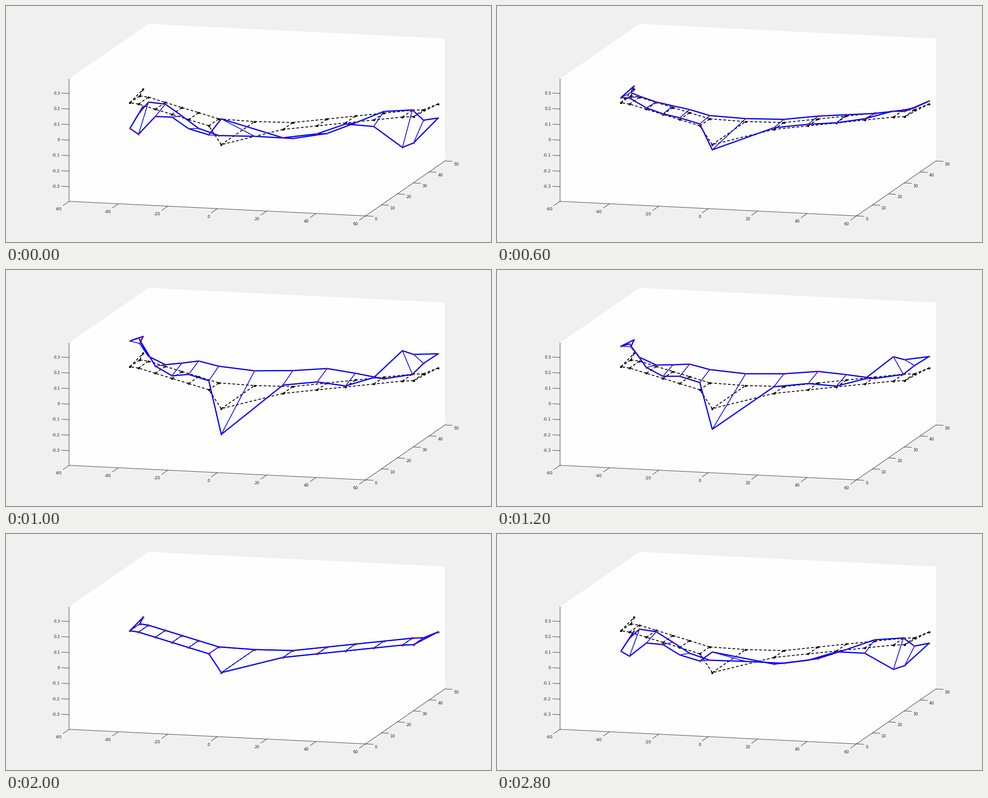
Animation of 1073 by 522 pixels, one loop 3 s. Source, as a matplotlib script:

```python
import numpy as np
import matplotlib.pyplot as plt
from matplotlib.animation import FuncAnimation
from matplotlib.collections import LineCollection

W, H, DPI = 1073, 522, 64
PT = 72 / DPI  # points per pixel
FRAMES, INTERVAL = 15, 200
INK = "#262626"
SPAN, DEPTH, TOP = 60, 50, 0.394  # limits of the 3D box

plt.rcParams["font.family"] = "DejaVu Sans"


def project(x, y, z):
    """Orthographic view of the box, in pixels from the top left."""
    u = np.asarray(x) + SPAN
    return np.stack([139.5 + 5.467 * u + 3.51 * y,
                     432 + 0.269 * u - 2.43 * y - 343.7 * (z + TOP)], axis=-1)


def mirror(half):
    return np.concatenate([half[:0:-1], half])


def around(tip_left, rear, tip_right, front):
    """Order values along the edge of the wing."""
    return np.concatenate([[tip_left], rear, [tip_right], front[::-1]])


# Planform: swept wing of constant chord with a deep centre section
half = np.array([0, 15, 26, 35.1, 44.2, 53.4, 57.4])
x = np.concatenate([-half[:0:-1], half])
front_y = np.interp(abs(x), [0, 15, 53.4, 57.4], [2.5, 18, 33.5, 34.3])
rear_y = front_y + np.where(x == 0, 21, 6.27)
TIP_X, TIP_Y = 59.7, 46.2

# Mode shape: symmetric bending, slight roll, and twist near the tips
front_z = mirror(np.array([-0.166, 0.056, 0.055, 0.012, 0.044, 0.195, 0.167]))
rear_z = mirror(np.array([0.095, 0.105, 0.097, 0.049, 0, 0.015, 0.086]))
twist = 0.00047 * np.sign(x) * np.maximum(abs(x) - 35, 0)

node_x = around(-TIP_X, x, TIP_X, x)
node_y = around(TIP_Y, rear_y, TIP_Y, front_y)
mode = around(0.1, rear_z - twist, 0.1, front_z + twist) - 0.00015 * node_x * (node_x != 0)

m = len(node_x)
outline = [(i, (i + 1) % m) for i in range(m)]
ribs = [(m - 1 - i, i + 1) for i in range(len(x))]


def pose(s):
    return project(node_x, node_y, s * mode)


def edges(points, pairs):
    return [points[list(p)] for p in pairs]


fig = plt.figure(figsize=(W / DPI, H / DPI), dpi=DPI, facecolor="#f0f0f0")
ax = fig.add_axes([0, 0, 1, 1])
ax.set_xlim(0, W)
ax.set_ylim(H, 0)
ax.axis("off")


def line(a, b):
    ax.plot(*np.transpose([a, b]), color=INK, lw=0.9 * PT, zorder=1)


def tick(start, step, gap, value, ha):
    """Tick mark from start, with its label a gap beyond the end."""
    end = start + step
    line(start, end)
    px, py = end + gap
    ax.text(px, py + 3.3, f"{value:g}", ha=ha, va="baseline", color=INK,
            fontsize=9 * PT, zorder=1)


def draw_box():
    left, right = -SPAN, SPAN
    corners = [(left, 0, TOP), (left, DEPTH, TOP), (right, DEPTH, TOP),
               (right, DEPTH, -TOP), (right, 0, -TOP), (left, 0, -TOP)]
    shape = [project(*c) for c in corners]
    ax.fill(*np.transpose(shape), color="#fefefe", lw=0, zorder=0)
    for a, b in [(3, 4), (4, 5)]:
        line(shape[a], shape[b])
    nudge = np.array([-0.3, 0])  # snaps the upright to its pixel column
    line(shape[5] + nudge, shape[0] + nudge)

    for k in range(-3, 4):
        tick(project(left, 0, k / 10), np.array([-16.5, -0.9]),
             np.array([-3.7, 0]), k / 10, "right")
    for v in range(left, right + 1, 20):
        tick(project(v, 0, -TOP), np.array([-13.5, 9.3]),
             np.array([-3, 7.9]), v, "right")
    for v in range(0, DEPTH + 1, 10):
        tick(project(right, v, -TOP), np.array([16.2, 0.9]),
             np.array([3.4, 5.6]), v, "left")


plt.rcParams["axes.unicode_minus"] = False
draw_box()

rest = pose(0)
ax.add_collection(LineCollection(
    edges(rest, outline + ribs), colors="black", linewidths=1.9 * PT,
    linestyles=[(0, (3.1, 2.2))], zorder=2))
ax.plot(*rest.T, "o", color="black", ms=4.8 * PT, mew=0, zorder=3)

hull = LineCollection([], colors="blue", linewidths=2.7 * PT,
                      capstyle="round", zorder=5)
struts = LineCollection([], colors="blue", linewidths=1.7 * PT, zorder=4)
ax.add_collection(hull)
ax.add_collection(struts)
dots, = ax.plot([], [], "o", color="red", ms=3.6 * PT, mew=0, zorder=6)


def update(i):
    # Fast rise over a third of the loop, slow return
    points = pose(np.interp(i, [0, 5, 15], [-1, 1, -1]))
    hull.set_segments(edges(points, outline))
    struts.set_segments(edges(points, ribs))
    dots.set_data(*points.T)
    return hull, struts, dots


anim = FuncAnimation(fig, update, frames=FRAMES, interval=INTERVAL,
                     repeat=True, repeat_delay=0)
plt.show()
```
